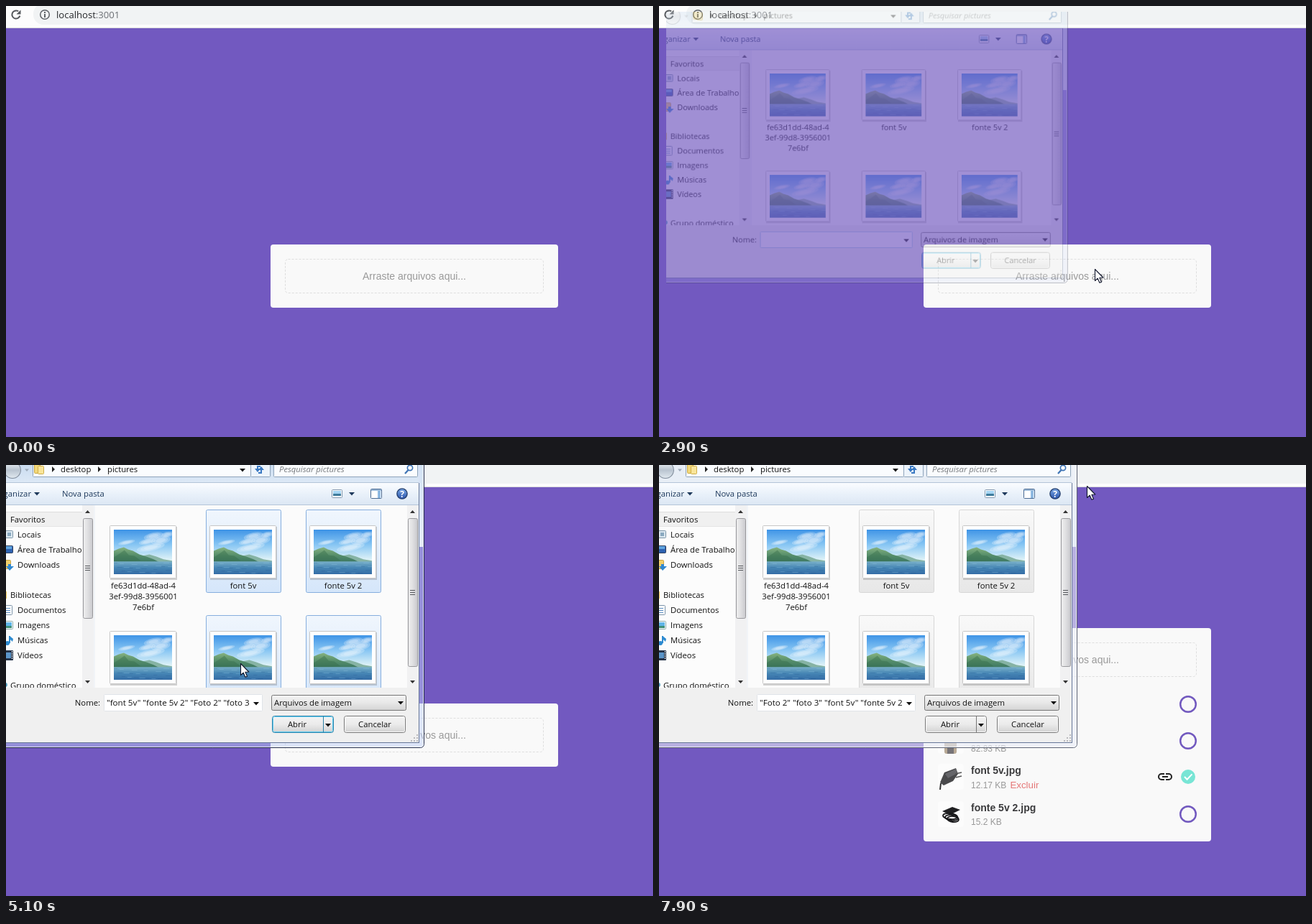
Recreate the animation shown at these times as an HTML page with a canvas. Size 900 by 600 pixels, loop 8 s.

```html
<!DOCTYPE html>
<html lang="pt-BR">
<head>
<meta charset="utf-8">
<title>Upload de arquivos</title>
<style>
html, body { margin: 0; width: 100%; height: 100%; overflow: hidden; background: #7259c0; }
canvas { display: block; }
</style>
</head>
<body>
<canvas id="stage" width="900" height="600"></canvas>
<script>
const LOOP = 8000, STEP = 100;
const UI = '"Open Sans", "Noto Sans", sans-serif';
const WEB = '"Liberation Sans", Arial, sans-serif';
const PURPLE = '#7259c0', TEAL = '#78e5d5';

function layer(w, h) {
  const c = document.createElement('canvas');
  c.width = w;
  c.height = h;
  return c.getContext('2d');
}
const stage = document.getElementById('stage').getContext('2d');
const windowLayer = layer(600, 410);
const dragLayer = layer(110, 110);
let g = stage;

// ---------- drawing helpers ----------
function rect(x, y, w, h, fill) {
  g.fillStyle = fill;
  g.fillRect(x, y, w, h);
}
function box(x, y, w, h, r, fill, stroke) {
  g.beginPath();
  g.roundRect(stroke ? x + .5 : x, stroke ? y + .5 : y, stroke ? w - 1 : w, stroke ? h - 1 : h, r);
  if (fill) { g.fillStyle = fill; g.fill(); }
  if (stroke) { g.strokeStyle = stroke; g.lineWidth = 1; g.stroke(); }
}
function poly(points, fill, stroke, width = 1) {
  g.beginPath();
  points.forEach(([x, y], i) => i ? g.lineTo(x, y) : g.moveTo(x, y));
  if (fill) { g.closePath(); g.fillStyle = fill; g.fill(); }
  if (stroke) { g.strokeStyle = stroke; g.lineWidth = width; g.stroke(); }
}
function disc(x, y, r, fill) {
  g.beginPath();
  g.arc(x, y, r, 0, 7);
  g.fillStyle = fill;
  g.fill();
}
function arc(x, y, r, from, to, color, width) {
  g.beginPath();
  g.arc(x, y, r, from, to);
  g.strokeStyle = color;
  g.lineWidth = width;
  g.stroke();
}
function fade(y0, y1, ...colors) {
  const f = g.createLinearGradient(0, y0, 0, y1);
  colors.forEach((c, i) => f.addColorStop(i / (colors.length - 1), c));
  return f;
}
function text(s, x, y, color = '#111', font = '11.3px ' + UI, align = 'left') {
  g.font = font;
  g.fillStyle = color;
  g.textAlign = align;
  g.fillText(s, x, y);
}
function clipped(x, y, w, h, draw) {
  g.save();
  g.beginPath();
  g.rect(x, y, w, h);
  g.clip();
  draw();
  g.restore();
}
const down = (x, y, r = 4, c = '#111') => poly([[x - r, y - r / 2], [x + r, y - r / 2], [x, y + r / 2 + .5]], c);

// ---------- pointer ----------
const path = [
  [1000, 806, 145], [1200, 766, 215], [1400, 668, 315], [1500, 632, 348], [1600, 614, 362],
  [1700, 608, 366], [2100, 608, 366], [2200, 606, 366], [3300, 606, 366], [3400, 585, 330],
  [3500, 505, 245], [3600, 458, 162], [3700, 488, 141], [3800, 513, 131], [4000, 530, 127],
  [4300, 530, 127], [4400, 500, 150], [4600, 340, 268], [4700, 301, 286], [4900, 301, 286],
  [5100, 326, 276], [5700, 326, 276], [5800, 390, 276], [5900, 560, 285], [6000, 676, 305],
  [6100, 676, 329], [6200, 673, 348], [6300, 668, 362], [6400, 665, 370], [6600, 660, 375],
  [7100, 660, 375], [7200, 657, 362], [7400, 640, 270], [7600, 615, 135], [7800, 598, 45], [7900, 595, 29]
];
function pointerAt(t) {
  const i = path.findIndex(k => k[0] >= t);
  if (i < 0) return path[path.length - 1].slice(1);
  if (i === 0) return path[0].slice(1);
  const a = path[i - 1], b = path[i], p = (t - a[0]) / (b[0] - a[0]);
  return [a[1] + (b[1] - a[1]) * p, a[2] + (b[2] - a[2]) * p].map(Math.round);
}
function arrow(x, y) {
  g.save();
  g.translate(x + .5, y + .5);
  g.lineJoin = 'round';
  const shape = [[0, 0], [0, 16], [3.7, 12.7], [6.4, 18.8], [9, 17.7], [6.4, 11.7], [11.3, 11.5], [0, 0]];
  poly(shape, '#fff', '#10162c', 1.1);
  g.restore();
}
function hand(x, y) {
  g.save();
  g.translate(x - 6, y);
  box(5, 0, 5, 14, 2.5, '#fff', '#111');
  g.beginPath();
  g.moveTo(9.5, 7);
  g.quadraticCurveTo(17, 7, 16.5, 11);
  g.quadraticCurveTo(16.5, 17, 14, 21.5);
  g.lineTo(5.5, 21.5);
  g.quadraticCurveTo(2, 16, .7, 12);
  g.quadraticCurveTo(2, 9, 5.5, 13);
  g.fillStyle = '#fff';
  g.fill();
  g.strokeStyle = '#111';
  g.stroke();
  rect(6, 5, 3, 11, '#fff');
  g.restore();
}
function drawPointer(t) {
  if (t < 1000) return;
  const [x, y] = pointerAt(t);
  if (t < 2200 && y > 352) return hand(x, y);
  arrow(x, y);
  if (t === 2200) {
    arc(x + 15, y, 5.5, 0, 7, '#2c8fc4', 3.4);
    arc(x + 15, y, 5.5, -2, 0, '#a9e6f7', 2.4);
  }
}

// ---------- page ----------
function drawBrowser() {
  rect(0, 0, 900, 600, PURPLE);
  rect(0, 0, 900, 30, '#fdfdfd');
  box(38, -3, 900, 29, 14, '#f1f3f4');
  rect(0, 30, 900, 1, '#d3d3da');
  arc(14, 12, 5.6, .3, 5.3, '#55585c', 2);
  poly([[20.5, 5.5], [20.5, 11.5], [14.5, 11.5]], '#55585c');
  arc(54, 12, 6.3, 0, 7, '#5f6368', 1.5);
  rect(53, 11, 2, 5, '#5f6368');
  rect(53, 8, 2, 2, '#5f6368');
  const font = '13.1px ' + UI;
  text('localhost', 70, 17, '#26282b', font);
  text(':3001', 70 + g.measureText('localhost').width, 17, '#6c7075', font);
}
function linkIcon(x, y) {
  arc(x - 5, y, 4, Math.PI / 2, Math.PI * 1.5, '#222', 2);
  arc(x + 5, y, 4, -Math.PI / 2, Math.PI / 2, '#222', 2);
  for (const dx of [-5, 1]) {
    rect(x + dx, y - 5, 4, 2, '#222');
    rect(x + dx, y + 3, 4, 2, '#222');
  }
  rect(x - 4, y - 1, 8, 2, '#222');
}
function adapter(y) {
  poly([[391, y + 8], [397, y - 6], [413, y - 12], [416, y - 4], [409, y + 6], [396, y + 12]], '#4a4a4c');
  poly([[398, y - 4], [413, y - 11], [415, y - 5], [402, y + 2]], '#66666a');
  poly([[412, y - 4], [421, y - 6]], null, '#555', 1.5);
  poly([[413, y + 1], [421, y - 1]], null, '#555', 1.5);
  poly([[392, y + 9], [391, y + 18]], null, '#333', 2);
}
function cable(y) {
  poly([[394, y - 4], [408, y - 10], [419, y - 6], [405, y + 1]], '#202022');
  for (let i = 0; i < 3; i++) {
    g.beginPath();
    g.ellipse(405 + i * 2, y + 3 + i * 2, 10 - i, 4, .1, 0, 7);
    g.strokeStyle = '#19191b';
    g.lineWidth = 1.8;
    g.stroke();
  }
}
const uploads = [
  { name: 'Foto 2.jpg', size: '61.4 KB', y: 333 },
  { name: 'foto 3.jpg', size: '82.93 KB', y: 384 },
  { name: 'font 5v.jpg', size: '12.17 KB', y: 434, icon: adapter, done: 7800 },
  { name: 'fonte 5v 2.jpg', size: '15.2 KB', y: 486, icon: cable }
];
function drawUpload(file, i, t) {
  const { name, size, y, icon, done } = file;
  box(388, y - 18, 36, 36, 4, '#fcfcfc');
  if (icon) icon(y);
  else {
    box(397, y - 10, 17, 28, 3, '#b9aa96');
    rect(401, y + 8, 9, 10, '#777478');
  }
  text(name, 434, y - 4, '#3b3b3d', 'bold 14px ' + WEB);
  const ready = done && t >= done, base = y + (ready ? 16 : 15);
  text(size, 434, base, '#999', '12px ' + WEB);
  if (ready) {
    text('Excluir', 488.4, base, '#e57878', '13.333px ' + WEB);
    linkIcon(704, y);
    disc(736, y, 10, TEAL);
    poly([[731, y], [734.6, y + 3.8], [741.5, y - 3.6]], null, '#fff', 2);
    return;
  }
  arc(736, y, 10.8, 0, 7, '#d9d9dd', 2.4);
  const p = Math.min(1, Math.max(0, (t - 7200 - i * 30) / 500));
  const eased = 1 - (1 - p) ** 2;
  if (p) arc(736, y, 10.8, -Math.PI / 2, -Math.PI / 2 + eased * Math.PI * 2, PURPLE, 2.4);
}
function drawCard(t) {
  const full = t >= 7200, top = full ? 227 : 332;
  const active = t >= 6300 && t < 7000;
  box(368, top, 400, full ? 297 : 88, 4, '#f9f9f9');
  g.setLineDash([3, 2]);
  box(388, top + 20, 360, 48, 4, null, active ? TEAL : '#dedede');
  g.setLineDash([]);
  text(active ? 'Solte os arquivos aqui' : 'Arraste arquivos aqui...', 568, top + 49,
    active ? TEAL : '#999', '14px ' + WEB, 'center');
  if (full) uploads.forEach((f, i) => drawUpload(f, i, t));
}

// ---------- thumbnails ----------
function landscape(x, y, w, h) {
  g.save();
  g.translate(x, y);
  g.scale(w / 82, h / 63);
  g.beginPath();
  g.rect(0, 0, 82, 63);
  g.clip();
  rect(0, 0, 82, 45, fade(0, 42, '#3f94e6', '#86c5f3', '#dcf1f7'));
  const clouds = [[56, 9, 14, 5], [66, 15, 14, 6], [47, 17, 12, 4], [75, 7, 9, 4], [52, 25, 20, 5], [18, 18, 12, 3]];
  for (const [cx, cy, rx, ry] of clouds) {
    for (let k = 0; k < 3; k++) {
      g.beginPath();
      g.ellipse(cx, cy, rx * (1 - k * .25), ry * (1 - k * .25), -.2, 0, 7);
      g.fillStyle = 'rgba(255,255,255,.24)';
      g.fill();
    }
  }
  poly([[30, 44], [40, 37], [50, 35], [60, 38], [70, 42], [82, 44], [82, 46], [30, 46]], '#86b3a4');
  poly([[0, 30], [7, 27], [14, 25], [20, 28], [27, 30], [36, 35], [46, 38], [56, 42], [64, 46], [0, 47]],
    fade(25, 47, '#86b27f', '#578f6b', '#3a7562'));
  poly([[0, 39], [8, 34], [15, 29], [21, 36], [29, 37], [38, 44], [0, 46]], 'rgba(50,106,72,.4)');
  rect(0, 45, 82, 18, fade(45, 63, '#79b0c9', '#4585b4', '#356da6'));
  for (let i = 0; i < 22; i++) {
    rect(i * 31 % 79, 47 + i * 7 % 15, 5 + i % 4, .7, i % 2 ? 'rgba(160,210,235,.35)' : 'rgba(25,65,125,.25)');
  }
  g.restore();
}
function photo(x, y, w, h, pad) {
  rect(x + 1, y + 2, w, h, 'rgba(60,60,60,.22)');
  box(x, y, w, h, 1, '#fff', '#c6c6c6');
  landscape(x + pad, y + pad, w - pad * 2, h - pad * 2);
}

// ---------- file dialog ----------
const names = ['fe63', 'font 5v', 'fonte 5v 2', 'Foto 1', 'Foto 2', 'foto 3'];
const itemPos = i => [139 + i % 3 * 139, 62 + Math.floor(i / 3) * 147];
const bandStart = [530, 127];

function selection(t) {
  if (t < 4400) return [];
  const [px, py] = pointerAt(Math.min(t, 4700));
  return [0, 1, 2, 3, 4, 5].filter(i => {
    const [x, y] = itemPos(i);
    return px < x + 99 && x + 5 < bandStart[0] && py > y + 22 && bandStart[1] < y + 114;
  });
}
function hovered(t) {
  if (t < 3400 || t > 4400) return -1;
  const [px, py] = pointerAt(t);
  return names.findIndex((n, i) => {
    const [x, y] = itemPos(i);
    return px > x && px < x + 105 && py > y && py < y + 116;
  });
}
function drawFiles(t) {
  const picked = selection(t), now = hovered(t), before = hovered(t - STEP);
  for (let i = 0; i < 6; i++) {
    const [x, y] = itemPos(i);
    if (picked.includes(i)) {
      const blur = t >= 7000;
      box(x, y, 105, 116, 2, blur ? fade(y, y + 116, '#f9f9f9', '#e7e7e7') : fade(y, y + 116, '#f0f6fd', '#d5e6fa'),
        blur ? '#d7d7d7' : '#86aede');
    } else if (i === now) box(x, y, 105, 116, 2, fade(y, y + 116, '#f9fcff', '#edf5fd'), '#bdd7f3');
    else if (i === before) box(x, y, 105, 116, 2, '#f8f9fa');
    photo(x + 5, y + 22, 93, 74, 6);
  }
  const label = (s, x, y) => text(s, x, y, '#111', undefined, 'center');
  ['fe63d1dd-48ad-4', '3ef-99d8-3956001', '7e6bf'].forEach((s, i) => label(s, 191, 172 + i * 15));
  label('font 5v', 330, 172);
  label('fonte 5v 2', 469, 172);
  if (t >= 4400 && t < 4900) {
    const [px, py] = pointerAt(t), [bx, by] = bandStart;
    box(px, by, bx - px, py - by, 0, 'rgba(72,144,220,.48)', '#6d9fd6');
  }
}
function scrollbar(x, end) {
  rect(x, 56, 16, 254, '#f1f1f2');
  const f = g.createLinearGradient(x, 0, x + 15, 0);
  f.addColorStop(0, '#f4f4f4');
  f.addColorStop(.5, '#e0e0e2');
  f.addColorStop(1, '#c8c8cc');
  box(x + 1, 74, 14, end - 74, 2, f, '#98989c');
  const mid = Math.round((74 + end) / 2);
  for (let i = -1; i < 2; i++) rect(x + 4, mid + i * 3 - 1, 7, 1, '#55585c');
  poly([[x + 4, 67], [x + 11, 67], [x + 7.5, 63]], '#333');
  poly([[x + 4, 300], [x + 11, 300], [x + 7.5, 304]], '#333');
}
function drawSidebar() {
  rect(0, 56, 106, 254, '#fcfcfc');
  rect(0, 66, 106, 20, '#f0f0f0');
  rect(0, 65, 106, 1, '#dedede');
  rect(0, 85, 106, 1, '#e4e4e4');
  clipped(0, 56, 106, 254, () => {
    const line = (s, x, y) => text(s, x, y + 4);
    line('Favoritos', 6, 76);
    line('Bibliotecas', 6, 181);
    line('Grupo doméstico', 6, 307);
    ['Locais', 'Área de Trabalho', 'Downloads'].forEach((s, i) => line(s, 16, 97 + i * 21));
    ['Documentos', 'Imagens', 'Músicas', 'Vídeos'].forEach((s, i) => line(s, 16, 202 + i * 21));
    box(-4, 91, 14, 11, 1, '#dbe7ef', '#7d96a8');
    rect(2, 94, 5, 5, '#8aa9c0');
    box(-5, 112, 15, 11, 1, '#2e62b0', '#30405c');
    rect(0, 113, 8, 4, '#5fa3df');
    box(-4, 132, 11, 13, 1, '#f1cf6b', '#c9a445');
    poly([[3, 138], [7, 138], [7, 141], [11, 141], [5, 147], [0, 141], [3, 141]], '#2f87d0');
    rect(-1, 176, 2, 10, '#eec95c');
    box(-3, 195, 12, 14, 1, '#fff', '#7b93a9');
    for (let i = 0; i < 3; i++) rect(0, 199 + i * 3, 6, 1, '#5b8cc0');
    box(-4, 217, 14, 12, 1, '#fff', '#8aa');
    rect(-2, 219, 10, 5, '#60b5e8');
    rect(-2, 224, 10, 3, '#3f8f77');
    disc(2, 248, 3, '#2d8ad0');
    rect(4, 238, 2, 10, '#2d8ad0');
    poly([[5, 238], [10, 242], [9, 246], [5, 242]], '#2d8ad0');
    box(-4, 258, 14, 14, 1, '#26344a');
    rect(-1, 261, 8, 8, '#5b95c9');
    for (let i = 0; i < 4; i++) rect(8, 259 + i * 3, 1, 2, '#fff');
    disc(-1, 306, 3, '#56a3c4');
  });
}
function refreshIcon(x, y) {
  poly([[x - 2, y + 1], [x - 2, y - 3], [x + 2, y - 3]], null, '#3a79c2', 2);
  poly([[x - 6, y], [x + 2, y], [x - 2, y + 5]], '#3a79c2');
  poly([[x + 3, y + 1], [x + 3, y + 6], [x - 1, y + 6]], null, '#3a79c2', 2);
  poly([[x - 1, y + 2], [x + 7, y + 2], [x + 3, y - 3]], '#3a79c2');
}
function drawToolbar() {
  disc(9, 7, 12, '#7f8b9a');
  disc(9, 7, 11, fade(-4, 18, '#eef2f6', '#b9c4d0', '#dfe7ee'));
  down(29, 7, 3, '#9eabba');
  box(37, -6, 304, 23, 1, '#fafcfe', '#8fa4bb');
  box(340, -6, 28, 23, 1, '#edf4fb', '#8fa4bb');
  box(372, -6, 201, 23, 1, '#fafcfe', '#8fa4bb');
  box(39, -2, 9, 14, 1, '#f3d879', '#c7a640');
  box(44, 1, 9, 12, 1, '#f9e59a', '#cfae4a');
  for (const x of [64, 128]) poly([[x, 2], [x + 4, 6], [x, 10]], '#222');
  text('desktop', 76, 10);
  text('pictures', 141, 10);
  down(329, 7);
  refreshIcon(352, 5);
  text('Pesquisar pictures', 380, 10, '#76797d', 'italic 11.3px ' + UI);
  arc(562, 4, 3.6, 0, 7, '#3f74b5', 1.7);
  poly([[559.5, 7], [555, 12]], null, '#3f74b5', 2.2);

  rect(0, 25, 574, 31, fade(25, 56, '#fafcff', '#e9f1fa', '#dbe6f3'));
  rect(0, 24, 574, 1, '#b3c4d8');
  rect(0, 55, 574, 1, '#b4c5d9');
  text('Organizar', 35, 44, '#1e395b', undefined, 'right');
  down(43, 40, 4, '#1e395b');
  text('Nova pasta', 78, 44, '#1e395b');
  box(453, 34, 15, 12, 1, '#fff', '#8297ae');
  rect(455, 36, 11, 4, '#a5d5f3');
  rect(455, 40, 11, 3, '#3f7c9c');
  down(481, 40, 4, '#1e395b');
  box(507, 33, 16, 14, 1, '#fff', '#4a6a92');
  rect(508, 34, 14, 2, '#9ebbd9');
  rect(517, 36, 4, 10, '#8fbae2');
  disc(551, 40, 7.8, '#26406f');
  disc(551, 40, 6.4, fade(33, 47, '#7ba9e6', '#2c56ad'));
  text('?', 551, 44.5, '#fff', 'bold 12px ' + UI, 'center');
}
function button(x, w, s, textX, lit) {
  box(x, 349, w, 24, 3, fade(349, 373, '#f4f4f4', '#ebebeb', '#d0d0d0'), lit ? '#2f82a8' : '#777');
  box(x + 1, 350, w - 2, 22, 2, null, lit ? '#5fcdf2' : '#fafafa');
  text(s, textX, 365, '#111', undefined, 'center');
}
function fieldText(t) {
  const list = selection(t).map(i => names[i]);
  if (list.length < 2) return list[0] || '';
  if (t >= 5700) list.push(...list.splice(0, 2));
  return list.map(n => `"${n}"`).join(' ');
}
function drawFooter(t) {
  rect(0, 310, 574, 76, '#f0f0f0');
  text('Nome:', 131, 335, '#111', undefined, 'right');
  const typing = t < 4000;
  box(136, 319, 221, 24, 1, '#fff', typing ? '#a7cce6' : '#e0e4e9');
  clipped(138, 320, 200, 22, () => text(fieldText(t), 140, 335, '#111', '11.6px ' + UI));
  if (typing && t >= 3500) rect(140, 324, 1, 15, '#000');
  down(348, 332);
  box(369, 320, 188, 22, 2, fade(320, 342, '#f4f4f4', '#e8e8e8', '#d2d2d2'), '#777');
  text('Arquivos de imagem', 373, 335);
  down(549, 331);
  const lit = t < 7000;
  button(370, 86, 'Abrir', 405, lit);
  rect(441, 350, 1, 22, lit ? '#2f82a8' : '#777');
  down(448, 362);
  button(470, 86, 'Cancelar', 513, false);
  for (let i = 0; i < 3; i++)
    for (let j = 0; j <= i; j++) rect(571 - j * 4, 375 + i * 4, 2, 2, '#b9b9bd');
}
function drawDialog(t) {
  g = windowLayer;
  g.clearRect(0, 0, 600, 410);
  const idle = t >= 7000;
  // translucent frame, lit in its upper part
  box(-10, -10, 592, 404, 5, idle ? 'rgba(232,236,247,.6)' : 'rgba(188,206,246,.48)', idle ? '#5c6274' : '#27314f');
  box(-9, -9, 590, 402, 4, null, 'rgba(255,255,255,.7)');
  rect(575, 0, 5, 114, fade(0, 114, idle ? '#eff2f8' : '#d3e2f4', '#e6edf8'));
  rect(574, 25, 1, 362, '#687899');
  rect(0, 386, 575, 1, '#687899');
  rect(0, 0, 574, 25, idle ? '#e8eef6' : fade(0, 25, '#cadcf0', '#dde9f6'));
  rect(0, 56, 574, 254, '#fbfbfb');
  drawToolbar();
  drawSidebar();
  scrollbar(106, 214);
  rect(122, 56, 2, 254, '#f1f4f8');
  clipped(124, 56, 434, 254, () => drawFiles(t));
  scrollbar(558, 281);
  drawFooter(t);
  g = stage;
  const p = Math.min(1, (t - 2800) / 300), scale = .94 + .06 * p;
  g.save();
  g.globalAlpha = p;
  g.translate(250, 190);
  g.scale(scale, scale);
  g.drawImage(windowLayer.canvas, -250, -190);
  g.restore();
}

// ---------- dragged pile ----------
function drawDrag(t) {
  const [hx, hy] = pointerAt(t - STEP), x = hx - 52, y = hy - 94;
  g = dragLayer;
  g.clearRect(0, 0, 110, 110);
  rect(2, 105, 104, 1, 'rgba(40,30,90,.3)');
  rect(105, 2, 1, 104, 'rgba(40,30,90,.3)');
  box(0, 0, 105, 105, 2, 'rgba(203,208,236,.5)', 'rgba(190,198,235,.4)');
  for (let i = 3; i > 0; i--) box(11 - i * 2, 31 - i * 2.6, 85, 68, 1, '#f8f9fb', '#b4b7c6');
  photo(11, 31, 85, 68, 5);
  g = stage;
  g.save();
  g.globalAlpha = .8;
  g.drawImage(dragLayer.canvas, x, y);
  g.restore();
  box(x + 43, y + 42, 17, 18, 1, fade(y + 42, y + 60, '#3e7bd0', '#0c429f'), '#e8f0fc');
  text('4', x + 51.5, y + 56, '#fff', 'bold 12px ' + UI, 'center');
  if (hx < 582) return;
  const copy = t >= 6300, tx = x + 63, ty = y + 106;
  box(tx, ty, copy ? 62 : 61, 20, 3, fade(ty, ty + 20, '#fff', '#e6e9f3'), '#777a84');
  if (copy) {
    rect(tx + 4, ty + 8, 11, 4, '#164a90');
    rect(tx + 7.5, ty + 4.5, 4, 11, '#164a90');
  } else {
    rect(tx + 4, ty + 8, 7, 4, '#14559f');
    poly([[tx + 9, ty + 4], [tx + 15, ty + 10], [tx + 9, ty + 16]], '#14559f');
  }
  text(copy ? 'Copiar' : 'Mover', tx + 20, ty + 14, '#1430a8', '11.6px ' + UI);
}

// ---------- playback ----------
function render(ms) {
  const t = Math.floor(ms % LOOP / STEP) * STEP;
  drawBrowser();
  drawCard(t);
  if (t >= 2900) drawDialog(t);
  if (t >= 5800 && t < 7000) drawDrag(t);
  drawPointer(t);
}
const start = performance.now();
function tick(now) {
  render(Math.max(0, now - start));
  requestAnimationFrame(tick);
}
render(0);
requestAnimationFrame(tick);
</script>
</body>
</html>
```
